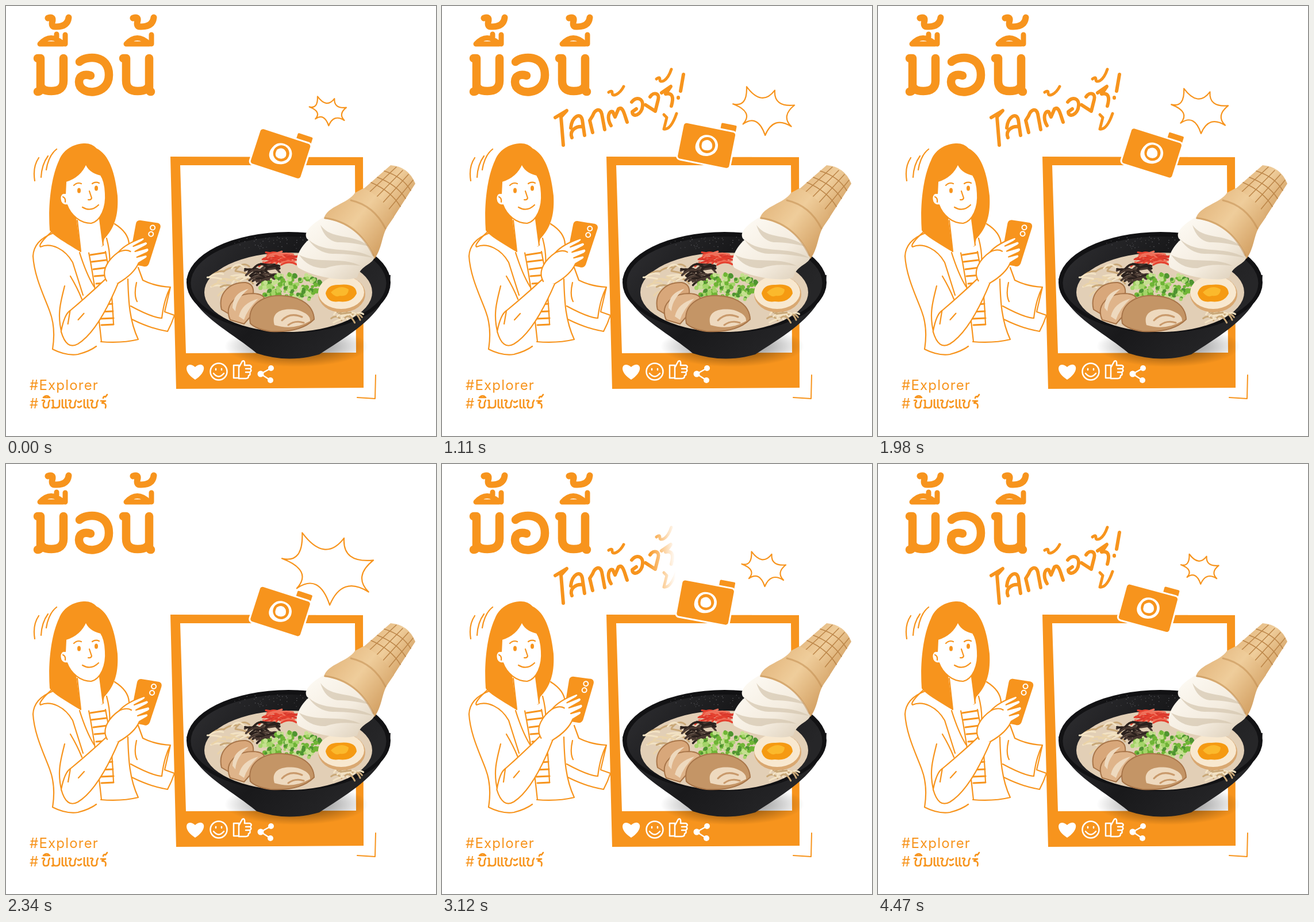
An HTML page that plays this animation: 748x748 px, repeating every 4.5 s.

```html
<!DOCTYPE html>
<html lang="th">
<head>
<meta charset="utf-8">
<title>มื้อนี้ โลกต้องรู้!</title>
<style>
html, body { margin: 0; width: 100%; height: 100%; overflow: hidden; background: #fff }
svg { display: block; width: 100vw; height: 100vh; fill: none; stroke-linecap: round; stroke-linejoin: round }
.o { stroke: #f7941d }
.f { fill: #f7941d }
.w { fill: #fff }
text { font: 24px Inter, sans-serif; letter-spacing: 1.2px; fill: #f7941d }
</style>
</head>
<body>
<svg viewBox="0 0 748 748">
<defs>
  <linearGradient id="wipe" gradientUnits="userSpaceOnUse" x1="0" x2="1" y1="0" y2="0">
    <stop stop-color="#fff"/><stop offset="1" stop-color="#fff" stop-opacity="0"/>
  </linearGradient>
  <mask id="reveal" maskUnits="userSpaceOnUse" x="180" y="90" width="270" height="170">
    <rect x="180" y="90" width="270" height="170" fill="url(#wipe)"/>
  </mask>
  <linearGradient id="dark" x2="1" y2=".4">
    <stop stop-color="#303033"/><stop offset=".5" stop-color="#19191b"/><stop offset="1" stop-color="#262628"/>
  </linearGradient>
  <linearGradient id="wafer" x2="1" y2=".8">
    <stop stop-color="#dfae72"/><stop offset=".5" stop-color="#efcd9b"/><stop offset="1" stop-color="#cf9a5b"/>
  </linearGradient>
  <linearGradient id="cream" x2="1" y2="1">
    <stop stop-color="#fffdf8"/><stop offset=".6" stop-color="#f4ecdf"/><stop offset="1" stop-color="#d9cab3"/>
  </linearGradient>
  <radialGradient id="shade">
    <stop stop-color="#000" stop-opacity=".6"/><stop offset="1" stop-color="#000" stop-opacity="0"/>
  </radialGradient>
  <path id="tone" d="M73 21q9-3 8 4q-3 11 4 11q22 1 24-16"/>
  <path id="cho" d="M0 2q4-1 4 2l-2 3v4q0 4 4 4q5 0 5-4V6l2-4"/>
  <path id="ae" d="M0 1v11q0 3 3 3M6 1v11q0 3 3 3"/>
</defs>

<!-- heading -->
<g class="o" stroke-width="14.5">
  <path d="M55 91h5v52q0 6-5 6M60 138Q62 148 79 148Q100 148 100 130V91"/>
  <path d="M128 97C140 86 179 84 179 120C179 157 127 157 127 132C127 121 136 118 147 121"/>
  <path d="M204 91h5v39Q209 148 229 148Q246 148 249 138V91M249 138v5q0 6 3 6"/>
  <g stroke-width="9"><path d="M59 66Q78 45 99 66ZM88 49v10M103 50v16M209 66Q228 45 249 66ZM253 50v16"/></g>
  <g stroke-width="11"><use href="#tone"/><use href="#tone" x="148"/></g>
</g>

<!-- brush lettering -->
<g mask="url(#reveal)"><g class="o" stroke-width="6">
  <path d="M197 194L217 182L207 193L211 242"/>
  <path d="M224 212C226 192 241 184 244 198L248 225M226 229C221 217 233 208 245 210"/>
  <path d="M262 220L257 199L262 191C266 180 275 176 278 188L283 215"/>
  <path d="M294 208C286 195 290 181 297 184L301 193L307 179C315 174 317 188 322 202"/>
  <path d="M290 150q6-4 6 1q0 6 7 3q8-4 13-14" stroke-width="5"/>
  <path d="M330 167C338 157 350 160 349 173C348 190 331 195 331 184L338 179"/>
  <path d="M362 158C368 149 379 151 376 163L371 183L354 172"/>
  <path d="M382 151L398 140L389 153C402 150 403 160 399 174"/>
  <path d="M373 127q6-5 6 1q0 5 7 2q8-5 13-20" stroke-width="5"/>
  <path d="M386 189L391 194L386 214Q398 216 408 187" stroke-width="5"/>
  <path d="M420 119L415 148M411 159v1"/>
</g></g>

<path id="burst" class="o" stroke-width="2.200" vector-effect="non-scaling-stroke"
  d="M-77-18Q-41-9-43-61Q-5-10 27-52Q24-10 76-15Q42 12 68 38Q24 10 3 60Q-15 6-52 32Q-25 2-77-18Z"/>

<!-- photo frame -->
<path class="f" fill-rule="evenodd" d="M286 262L621 263L622 664L296 666ZM303 277L313 604L609 603L607 277Z"/>
<path class="o" stroke-width="2" d="M611 681L642 683L643 642"/>
<path class="w" d="M329 650C304 634 315 616 329 628C344 615 354 634 329 650Z"/>
<g stroke="#fff" stroke-width="2.5">
  <circle cx="370" cy="636" r="14.5"/><path d="M361 639q9 11 18 0M365 631v2M375 631v2"/>
  <path d="M396 625h9v22h-9ZM405 629L411 618q5-3 4 7h9q5 2 1 6q3 4-1 6q2 5-2 6q0 5-5 5h-12M417 631h7M417 637h7"/>
  <path d="M461 630L443 640L460 651"/>
</g>
<g class="w"><circle cx="461" cy="630" r="5"/><circle cx="443" cy="640" r="5.5"/><circle cx="460" cy="651" r="5"/></g>

<!-- camera -->
<g id="camera">
  <rect x="18" y="-44" width="27" height="15" rx="2" class="f"/>
  <rect x="-47" y="-33" width="94" height="66" rx="6" class="f" stroke="#fff" stroke-width="3"/>
  <path class="w" d="M-15-10C-9-22 14-22 19-6C24 12 5 21-7 18C-20 14-22 2-15-10Z"/>
  <circle class="f" cx="1" cy="-1" r="14"/><path class="w" d="M-8-5q8-9 16-1q6 10-4 14q-15 3-12-13Z"/>
</g>

<!-- bowl -->
<ellipse cx="505" cy="592" rx="125" ry="36" fill="url(#shade)"/>
<path fill="url(#dark)" d="M314 474C318 534 386 562 436 604Q490 622 545 606C600 570 666 534 669 468Z"/>
<ellipse cx="491.500" cy="481" rx="177.500" ry="88" fill="#121214"/>
<ellipse cx="491.500" cy="482" rx="170" ry="81" fill="url(#dark)"/>
<ellipse cx="491" cy="498" rx="146" ry="69" fill="#e2cfb6"/>
<g id="food"></g>
<g stroke="#a87549" stroke-width="2">
  <path fill="#d8a77a" d="M375 528C368 500 389 480 417 481Q432 484 430 500L395 540Z"/>
  <path fill="#dfb48a" d="M390 546C378 519 402 500 430 500Q450 501 450 512L414 553Z"/>
  <path fill="#c49566" d="M425 552C419 520 447 502 481 504C514 506 535 521 536 545Q512 569 460 566Q434 562 425 552Z"/>
</g>
<path fill="#eed9be" d="M467 555C460 532 481 524 508 529Q530 536 529 548Q500 565 467 555ZM394 525Q394 499 422 492Q400 510 399 531ZM405 540Q410 517 439 509Q420 527 414 546Z"/>
<path stroke="#c99a6c" stroke-width="3" d="M480 547q14-15 35-6M491 555q12-9 27-4"/>
<ellipse cx="584" cy="501" rx="41" ry="32" fill="#d9a871"/>
<ellipse cx="583" cy="498" rx="40" ry="29" fill="#f8e8cf"/>
<path fill="#f59a12" d="M556 500Q559 484 580 485Q609 482 610 500Q602 517 579 514Q560 517 556 500Z"/>
<path fill="#fbb92c" d="M565 498q16-15 31-5q-1 13-15 11q-8 4-16-6Z"/>

<!-- soft ice cream -->
<path fill="url(#cream)" d="M555 366C525 382 515 399 526 407C507 424 502 445 508 455C540 474 595 480 611 472C617 451 635 451 641 438L620 390Z"/>
<g fill="#d5c7b0" opacity=".7">
  <path d="M526 406C556 434 600 415 639 438Q594 430 568 431Q542 430 526 406ZM510 433C543 450 585 435 617 452Q580 447 556 456Q526 457 510 433ZM547 381C566 408 602 394 632 418Q596 410 577 411Q555 408 547 381Z"/>
</g>
<path fill="url(#wafer)" d="M669 277Q700 279 712 309L674 368L622 318Z"/>
<g stroke="#bd874a" stroke-width="1.6"><path d="M658 287Q690 297 704 321M646 298Q680 311 695 335M635 307Q670 322 686 349M679 280L631 325M690 286L642 335M700 293L653 345M708 303L664 356"/></g>
<path fill="url(#wafer)" d="M622 317L607 325C595 344 558 348 553 370C590 374 631 403 641 440C655 420 653 400 664 383L675 367Q655 332 622 317Z"/>
<path stroke="#c08a4c" stroke-width="3" opacity=".5" d="M600 338Q640 347 660 387M555 369Q611 376 639 434"/>

<!-- woman -->
<g class="o" stroke-width="2.200">
  <path d="M50 304Q46 280 57 264M61 298Q62 276 73 261M70 285Q74 260 88 249"/>
  <path d="M82 395C61 403 48 416 47 435C49 471 67 506 76 531Q87 560 81 597Q105 609 125 606Q145 601 157 592"/>
  <path d="M79 393C67 404 56 416 60 419C79 411 103 423 116 446L134 503M128 429Q140 467 153 488M102 487C96 512 88 535 97 569M112 470Q124 490 132 510"/>
  <path d="M189 379Q213 394 214 414M175 404Q182 430 180 452M212 475C213 515 215 548 230 580Q201 587 165 584M230 455L238 477Q260 488 286 489Q275 510 271 543Q254 542 217 522M286 489L276 532L293 538Q288 553 281 566Q251 561 219 545M227 481Q222 503 228 514"/>
  <path d="M144 429Q156 490 166 584M173 427Q184 480 187 553"/>
  <g stroke-width="3"><path d="M147 433l26-4M149 445l25-3M152 458l24-3M154 470l25-2M157 483l25-2M159 495l24-2M160 508l24-2M162 520l23-2M163 532l23-1M164 544l23-1M166 555l21-1"/></g>
  <path class="f" stroke="none" d="M130 428C104 412 81 399 76 390C73 348 78 299 92 269C99 250 117 240 135 239Q149 238 158 248C180 259 190 292 194 330C196 365 188 387 171 405L168 418Z"/>
  <path class="w" stroke="none" d="M122 368L130 428Q150 433 169 416L163 370Z"/>
  <path class="w" d="M139 274C132 291 120 300 104 305L103 326C91 322 91 349 106 346C113 365 130 378 148 378C165 374 175 350 173 325Q172 304 165 294Q144 289 139 274Z"/>
  <path d="M124 373L130 427M163 370L169 416M99 332q5 2 4 9M118 312q6-6 13-3M150 309q6-4 12-1M145 322l4 12q-1 4-6 3M133 350Q148 359 161 346"/>
  <g class="f" stroke="none"><ellipse cx="127" cy="321" rx="3" ry="4.500"/><ellipse cx="157" cy="317" rx="3" ry="4.500"/></g>
</g>
<g id="arm" class="o" stroke-width="2.200">
  <path class="w" d="M112 530Q146 502 178 472L196 483Q160 567 125 588Q105 599 96 566Q102 536 112 530Z"/>
  <path class="f" d="M235 375L266 380Q271 382 269 388L249 449Q246 455 240 453L220 449Q215 447 217 441L229 380Q230 375 235 375Z"/>
  <g stroke="#fff" stroke-width="2"><circle cx="257" cy="387" r="4"/><circle cx="254" cy="398" r="4"/></g>
  <path class="w" d="M176 479C165 460 181 440 197 429Q209 415 240 404q6 2-2 7L223 419L245 411q6 3 0 7L226 428L248 422q5 4-1 8L229 438L245 434q5 3-1 7L232 448Q224 467 196 483"/>
  <path d="M197 429Q210 423 218 428M112 530L108 553M136 535l-10 11"/>
</g>

<!-- hashtags -->
<text x="41" y="668">#Explorer</text>
<text x="41" y="700">#</text>
<g class="o" stroke-width="2.700">
  <use href="#cho" x="63" y="684"/><use href="#ae" x="98" y="684"/><use href="#cho" x="109" y="684"/>
  <use href="#ae" x="136" y="684"/><use href="#cho" x="147" y="684"/>
  <path d="M65 681q6-6 11 0ZM80 686h2v13h-2M82 695q0 4 5 4q6 0 6-5V686M125 688q2 3 6-1M125 697q2 3 6-1M165 687h8q-10 4-3 4q5 1 3 8M169 682q1-4 4-2l3-4"/>
</g>
</svg>
<script>
const $ = id => document.getElementById(id);
const wave = x => (1 - Math.cos(2 * Math.PI * x)) / 2;

// Toppings scattered with a fixed seed
let seed = 7;
const rnd = () => (seed = seed * 16807 % 2147483647) / 2147483647;
function scatter(count, cx, cy, rx, ry, colors, draw) {
  let out = '';
  for (let i = 0; i < count; i++) {
    const a = rnd() * 2 * Math.PI, r = Math.sqrt(rnd());
    out += draw(cx + rx * r * Math.cos(a), cy + ry * r * Math.sin(a), colors[i % colors.length]);
  }
  return out;
}
const strand = (len, width) => (x, y, c) =>
  `<path stroke="${c}" stroke-width="${width}" d="M${x - len} ${y + rnd() * 12 - 6}Q${x} ${y - 14 * rnd()} ${x + len} ${y + rnd() * 14 - 7}"/>`;
const ring = (x, y, c) => `<circle cx="${x}" cy="${y}" r="${2 + rnd() * 2.5}" fill="${c}"/>`;
const speck = (x, y, c) => `<circle cx="${x}" cy="${y}" r=".8" fill="${c}"/>`;
$('food').innerHTML =
  scatter(70, 485, 413, 105, 12, ['#57575a', '#424245'], speck) +
  scatter(22, 392, 474, 30, 26, ['#f3e3c4', '#c9a878', '#ead3a9'], strand(12, 3)) +
  scatter(14, 590, 540, 26, 9, ['#f3e3c4', '#c9a878'], strand(9, 3)) +
  scatter(26, 473, 444, 24, 13, ['#e5412f', '#f0705a', '#d9382c'], strand(13, 3)) +
  scatter(26, 449, 467, 25, 15, ['#2b211d', '#4a3a32'], strand(12, 3.5)) +
  scatter(190, 496, 490, 54, 25, ['#6fb536', '#a5d46a', '#4f9431', '#c4e08e'], ring);

// Times and values of the starburst extremes
const pulse = [[0, .42], [900, 1.12], [1270, .43], [1640, .43], [2540, 1.12], [2930, .43], [3850, 1.12], [4370, .43], [4500, .43]];
const sweep = [[0, 180], [150, 190], [690, 402], [870, 406], [1065, 480], [2250, 480]];
function track(keys, t, ease = x => x) {
  const i = Math.max(1, keys.findIndex(k => k[0] > t));
  const [t0, a] = keys[i - 1], [t1, b] = keys[i];
  return a + (b - a) * ease((t - t0) / (t1 - t0));
}

function frame() {
  const t = performance.now() % 4500, p = t % 2250;
  const sway = wave(p / 1830 + .5), edge = track(sweep, p);
  $('camera').setAttribute('transform',
    `translate(${458 + 19.5 * sway} ${241 + 16 * sway}) rotate(${10.5 + 7.5 * sway})`);
  $('arm').setAttribute('transform', `rotate(${3.6 * wave((p - 640) / 1000) - 3.5} 110 585)`);
  $('burst').setAttribute('transform',
    `translate(560 183) scale(${track(pulse, t, x => wave(x / 2))})`);
  $('wipe').setAttribute('x1', edge - 48);
  $('wipe').setAttribute('x2', edge);
  requestAnimationFrame(frame);
}
frame();
</script>
</body>
</html>
```
